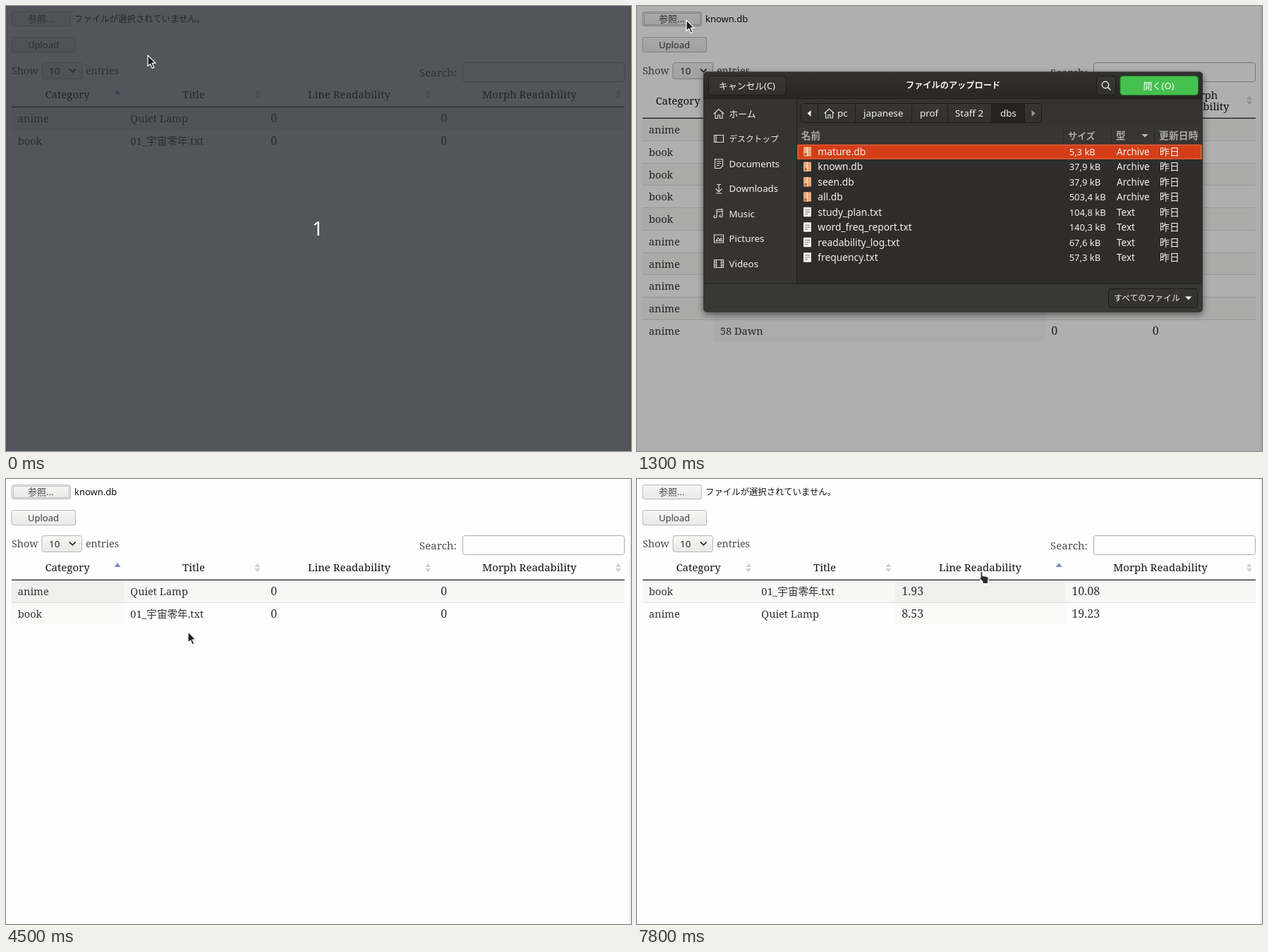
Write an HTML page that moves like this. It is 886x632 px and loops after 8 s.

```html
<!DOCTYPE html>
<html lang="ja">
<head>
<meta charset="utf-8">
<title>File upload</title>
<style>
html, body { margin: 0; width: 100%; height: 100%; overflow: hidden; background: #fefefe; }
svg { display: block; }
text { white-space: pre; }
.serif { font-family: "Noto Serif", "Noto Sans CJK JP", serif; }
.ui { font-family: "Noto Sans", "Noto Sans CJK JP", sans-serif; }
</style>
</head>
<body>
<svg id="stage" width="886" height="632" viewBox="0 0 886 632">
  <defs>
    <linearGradient id="btn" x2="0" y2="1"><stop stop-color="#f6f6f5"/><stop offset="1" stop-color="#e9e9e8"/></linearGradient>
    <linearGradient id="bar" x2="0" y2="1"><stop stop-color="#32312f"/><stop offset="1" stop-color="#282725"/></linearGradient>
    <linearGradient id="dark" x2="0" y2="1"><stop stop-color="#373634"/><stop offset="1" stop-color="#31302e"/></linearGradient>
    <filter id="shadow" x="-10%" y="-10%" width="120%" height="125%">
      <feDropShadow dx="0" dy="3" stdDeviation="5" flood-opacity=".5"/>
    </filter>
  </defs>
</svg>
<script>
const LOOP = 8000, STEP = 100;
const stage = document.getElementById('stage');

function add(parent, tag, attrs = {}, content) {
  const el = document.createElementNS('http://www.w3.org/2000/svg', tag);
  for (const key in attrs) el.setAttribute(key, attrs[key]);
  if (content !== undefined) el.textContent = content;
  parent.append(el);
  return el;
}
const group = (parent, attrs) => add(parent, 'g', attrs);
const rect = (p, x, y, width, height, fill, more) => add(p, 'rect', { x, y, width, height, fill, ...more });
const path = (p, d, fill, more) => add(p, 'path', { d, fill, ...more });
const write = (p, x, y, str, size, fill, more) =>
  add(p, 'text', { x, y, 'font-size': size, fill, ...more }, str);
const centred = { 'text-anchor': 'middle' };
const show = (el, on) => el.setAttribute('display', on ? 'inline' : 'none');

// Page controls
const page = group(stage, { class: 'serif' });
rect(page, 0, 0, 886, 632, '#fefefe');
rect(page, 884, 0, 2, 632, '#ebebf1');

const controls = group(page, { class: 'ui' });
function button(y, w, h) {
  return rect(controls, 8, y, w, h, 'url(#btn)', { rx: 2.5, stroke: '#b9b8b6' });
}
button(8.5, 83.5, 20);
write(controls, 31, 23, '参照...', 13, '#444');
const focusRing = rect(controls, 10.5, 10.5, 79, 16, 'none', { stroke: '#888', 'stroke-dasharray': '1 1' });
const upload = button(44.5, 90.5, 21);
write(controls, 53, 59.5, 'Upload', 13, '#3c3c3c', centred);
const noFile = write(controls, 97, 23, 'ファイルが選択されていません。', 12.4, '#111');
const picked = write(controls, 97, 23, 'known.db', 13, '#111');

write(page, 8, 97, 'Show', 14.4, '#4a4a4a');
rect(page, 51, 80.5, 56.5, 23, 'url(#btn)', { rx: 3, stroke: '#b4b4b4' });
write(page, 61, 97, '10', 13.4, '#222', { class: 'ui', 'font-weight': 500 });
path(page, 'M90 89.5l4.3 4.3 4.3-4.3', 'none', { stroke: '#333', 'stroke-width': 1.8 });
write(page, 113, 97, 'entries', 14.2, '#4a4a4a');
write(page, 586, 100, 'Search:', 15, '#4a4a4a');
rect(page, 647.5, 80.5, 229, 27, '#fefefe', { rx: 3, stroke: '#aaa' });

// Tables
function sortMark(p, x, y, active) {
  if (active) return path(p, `M${x - 4.5} ${y - 1}h9l-4.5-6z`, '#7b8acb');
  path(p, `M${x - 4} ${y - 1}h8l-4-5.5zM${x - 4} ${y + 1}h8l-4 5.5z`, '#d2d2d2');
}

function table({ edges, sorted, top, pitch, heads, marks, markY, rows }) {
  const g = group(page);
  heads.forEach(([str, x, y]) => write(g, x, y, str, 15, '#141414', centred));
  marks.forEach((x, i) => sortMark(g, x, markY, i === sorted));
  rows.forEach((row, r) => {
    const y = top + r * pitch, odd = r % 2 === 0, h = pitch - 1;
    if (odd) rect(g, 8, y, 869, h, '#f7f7f6');
    rect(g, edges[sorted], y, edges[sorted + 1] - edges[sorted], h, odd ? '#f0f0ef' : '#f9f9f8');
    if (r) rect(g, 8, Math.round(y - 1), 869, 1, '#dcdcdc');
    row.forEach((str, c) => write(g, edges[c] + 9.3, y + 21, str, c > 1 ? 16 : 14.6, '#333'));
  });
  rect(g, 8, top - 1.2, 869, 1.2, '#181818');
  return g;
}

const smallTable = (sorted, rows) => table({
  edges: [7.5, 167, 366, 607, 877], sorted, rows, top: 144, pitch: 31.8, markY: 126,
  heads: [['Category', 87, 131], ['Title', 266, 131], ['Line Readability', 486.5, 131], ['Morph Readability', 742, 131]],
  marks: [158, 356.5, 598, 868]
});
const anime = 'Quiet Lamp', book = '01_宇宙零年.txt';
const kinds = ['anime', 'book', 'book', 'book', 'book', 'anime', 'anime', 'anime', 'anime', 'anime'];
const tables = {
  empty: smallTable(0, [['anime', anime, '0', '0'], ['book', book, '0', '0']]),
  scored: smallTable(0, [['anime', anime, '8.53', '19.23'], ['book', book, '1.93', '10.08']]),
  byLine: smallTable(2, [['book', book, '1.93', '10.08'], ['anime', anime, '8.53', '19.23']]),
  long: table({
    edges: [7.5, 108.5, 578, 721.5, 877], sorted: 1, top: 160, pitch: 31.75, markY: 134,
    heads: [['Category', 58, 140], ['Title', 343, 140], ['Morph', 799, 131.5], ['Readability', 799, 147.5]],
    marks: [99, 569, 712, 868],
    rows: kinds.map((kind, i) => [kind, i === 9 ? '58 Dawn' : '', '0', '0'])
  })
};

const dim = rect(stage, 0, 0, 886, 632, '#000');

// File dialog
const dialog = group(stage, { class: 'ui' });
rect(dialog, 94, 93.5, 708, 341.5, '#383735', { rx: 5, filter: 'url(#shadow)' });
path(dialog, 'M94 132V99q0-5.5 6-5.5H796q6 0 6 5.5V132z', 'url(#bar)');
rect(dialog, 94, 131.5, 708, 1, '#1b1a19');
rect(dialog, 95, 132.5, 131, 262, '#353432');
rect(dialog, 227, 132.5, 574, 39, '#343331');
rect(dialog, 227, 172, 574, 24, '#373634');
rect(dialog, 227, 196, 574, 198, '#2e2d2b');
rect(dialog, 226, 132, 1, 263, '#222120');
rect(dialog, 95, 394, 706, 1, '#222120');

const LIGHT = '#f2f1ef';
function darkButton(x, y, w, h) {
  return rect(dialog, x + .5, y + .5, w - 1, h - 1, 'url(#dark)', { rx: 4, stroke: '#1c1b1a' });
}
darkButton(101, 99, 111, 28);
write(dialog, 156, 117.5, 'キャンセル(C)', 12.8, LIGHT, centred);
write(dialog, 448, 117, 'ファイルのアップロード', 12.2, LIGHT, { ...centred, 'font-weight': 700 });
darkButton(651, 99, 28, 28);
add(dialog, 'circle', { cx: 664, cy: 112, r: 4.7, fill: 'none', stroke: LIGHT, 'stroke-width': 1.4 });
path(dialog, 'M667.5 115.5l3.7 3.7', 'none', { stroke: LIGHT, 'stroke-width': 1.6 });
const openButton = rect(dialog, 685, 99.5, 110.5, 27, '#46c04e', { rx: 4, stroke: '#2b7d31' });
write(dialog, 739.5, 117.5, '開く(O)', 13, '#fff', centred);

// Path bar
darkButton(232, 138, 342, 28);
rect(dialog, 503, 139, 46, 26, '#242322');
[256, 309, 389, 440, 502, 549].forEach(x => rect(dialog, x, 139, 1, 26, '#1f1e1d'));
path(dialog, 'M246.5 148v9l-5-4.5z', LIGHT);
path(dialog, 'M559.5 148v9l5-4.5z', '#9a9997');
[['pc', 284], ['japanese', 321], ['prof', 401], ['Staff 2', 451], ['dbs', 515]]
  .forEach(([str, x]) => write(dialog, x, 157, str, 13.4, LIGHT));

// Sidebar
const icons = {
  home: 'M-7 0L0-6.5 7 0M-5-1.5V6.5H-1.5V2H1.5V6.5H5V-1.5',
  desk: 'M-6.5-5H6.5V5H-6.5zM-4-5V5',
  doc: 'M-5.5-6.5H5.5V3L2 6.5H-5.5zM-3-3.5H3M-3-.5H3M-3 2.5H1',
  down: 'M0-6V4M-4.5 0L0 4.5 4.5 0M-4 6.5H4M-3-6H3',
  note: 'M-3 4V-5.5L5-6.5V3M-3-2.5L5-3.5M-3 4a2 1.6 0 1 1-2-1.5M5 3a2 1.6 0 1 1-2-1.5',
  image: 'M-6.5-5.5H6.5V5.5H-6.5zM-4 3L-1-1 1 1.5 3-.5 4.5 3zM3-3h1',
  film: 'M-6.5-5.5H6.5V5.5H-6.5zM-3.5-5.5V5.5M3.5-5.5V5.5M-6.5-2H-3.5M-6.5 2H-3.5M3.5-2H6.5M3.5 2H6.5'
};
const icon = (x, y, name) => path(dialog, icons[name], 'none',
  { transform: `translate(${x} ${y})`, stroke: '#dddcda', 'stroke-width': 1.2 });
icon(272.5, 152.5, 'home');
[['ホーム', 'home', 12.8], ['デスクトップ', 'desk', 11.7], ['Documents', 'doc'], ['Downloads', 'down'],
  ['Music', 'note'], ['Pictures', 'image'], ['Videos', 'film']].forEach(([str, name, size = 13.3], i) => {
  const y = 153 + i * 35.5;
  icon(116, y, name);
  write(dialog, 130.5, y + 4.7, str, size, LIGHT);
});

// File list
[['名前', 233, 13.5], ['サイズ', 611, 13], ['型', 679, 13.5], ['更新日時', 740, 13.9]]
  .forEach(([str, x, size]) => write(dialog, x, 188.5, str, size, '#a9a8a6', { 'font-weight': 700 }));
[604, 672, 733].forEach(x => rect(dialog, x, 173, 1, 22, '#2a2928'));
path(dialog, 'M715.5 182h9l-4.5 4.5z', '#bbbab8');

const ROW = 21.45;
const selection = group(dialog);
rect(selection, 227, 196.5, 574, 21.3, '#d33e17');
rect(selection, 228.5, 197.5, 571, 19.3, 'none', { stroke: '#ec9c82', 'stroke-dasharray': '1 1' });
[['mature.db', '5,3 kB'], ['known.db', '37,9 kB'], ['seen.db', '37,9 kB'], ['all.db', '503,4 kB'],
  ['study_plan.txt', '104,8 kB'], ['word_freq_report.txt', '140,3 kB'],
  ['readability_log.txt', '67,6 kB'], ['frequency.txt', '57,3 kB']].forEach(([name, size], i) => {
  const y = 207 + i * ROW, archive = name.endsWith('.db');
  rect(dialog, 236, y - 7, 11, 13.5, archive ? '#eaa878' : '#f4f3f1', { rx: 1 });
  if (archive) {
    rect(dialog, 240.5, y - 7, 1.5, 13.5, '#f8dcc4');
    rect(dialog, 237, y + 2, 4, 3, '#b56d45');
  } else {
    path(dialog, `M238 ${y - 3}h7m-7 3h7m-7 3h4`, 'none', { stroke: '#77756f' });
  }
  write(dialog, 256.3, y + 5, name, 13.8, LIGHT);
  write(dialog, 612.7, y + 5, size, 13, LIGHT);
  write(dialog, 680, y + 5, archive ? 'Archive' : 'Text', 13.5, LIGHT);
  write(dialog, 741, y + 5, '昨日', 13.9, LIGHT);
});
darkButton(668, 401, 127, 28);
write(dialog, 676, 418.5, 'すべてのファイル', 11.9, LIGHT);
path(dialog, 'M777 412.5h9.5l-4.75 5z', LIGHT);

// Countdown and pointers
const countdown = group(stage, { class: 'ui' });
rect(countdown, 0, 0, 886, 632, 'rgb(39,43,51)', { 'fill-opacity': .8 });
write(countdown, 442, 326, '1', 28, '#fff', centred);

const outline = { stroke: '#fff', 'stroke-width': 1.2, 'stroke-linejoin': 'round' };
const arrow = path(stage, 'M0 0V15.5L3.6 12.2 6.4 18.4 9 17.2 6.2 11.2H11z', '#1d1d1d', outline);
const hand = path(stage,
  'M2 1.5q1.5-2 3 0V6.5l6 .8q2.5.4 2.3 2.7L12.5 14v3.5H5V15L0 10q-.5-2 2-1z', '#2b2b2b', outline);

// Timing: [time, x, y]
const track = [
  [0, 201, 70], [400, 201, 70], [800, 70, 20], [1300, 70, 20], [1800, 240, 108], [1900, 240, 108],
  [2000, 262, 165], [2100, 284, 235], [2200, 284, 235], [2300, 290, 232], [2400, 293, 226],
  [3200, 293, 226], [3300, 292, 224], [4200, 292, 224], [4300, 282, 222], [4500, 258, 217],
  [4600, 246, 248], [4700, 246, 248], [5300, 62, 57], [6700, 62, 57], [7200, 478, 154],
  [7300, 482, 131], [7600, 482, 131], [7800, 485, 131], [LOOP, 485, 131]
];
const dimming = [[0, 0], [800, 0], [900, .016], [1300, .315], [3400, .315], [3500, .12], [3600, 0], [LOOP, 0]];
const fade = [[0, 1], [300, 0], [LOOP, 0]];

function sample(keys, t) {
  const i = keys.findIndex(key => key[0] > t);
  const a = keys[i - 1], b = keys[i], k = (t - a[0]) / (b[0] - a[0]);
  return a.slice(1).map((v, n) => v + (b[n + 1] - v) * k);
}

function draw(now) {
  const t = Math.floor(now % LOOP / STEP) * STEP;
  const within = (from, to) => t >= from && t < to;

  const current = within(900, 1400) ? 'long' : t < 5900 ? 'empty' : t < 7500 ? 'scored' : 'byLine';
  for (const name in tables) show(tables[name], name === current);

  const chosen = within(900, 1400) || within(3300, 5900);
  show(picked, chosen);
  show(noFile, !chosen);
  show(focusRing, within(900, 1400) || within(3500, 5600));
  upload.setAttribute('fill', within(5600, 5900) ? '#dededd' : within(5300, 6900) ? '#fafaf9' : 'url(#btn)');

  dim.setAttribute('opacity', sample(dimming, t)[0]);
  show(dialog, within(900, 3500));
  selection.setAttribute('transform', `translate(0 ${t >= 2800 ? ROW : 0})`);
  openButton.setAttribute('fill', t >= 3000 ? '#3aa642' : '#46c04e');
  countdown.setAttribute('opacity', sample(fade, t)[0]);

  const pointing = t >= 7300;
  const pointer = pointing ? hand : arrow;
  show(arrow, !pointing);
  show(hand, pointing);
  pointer.setAttribute('transform', `translate(${sample(track, t).map(Math.round)})`);
}

const start = performance.now();
function tick() {
  draw(performance.now() - start);
  requestAnimationFrame(tick);
}
tick();
</script>
</body>
</html>
```
